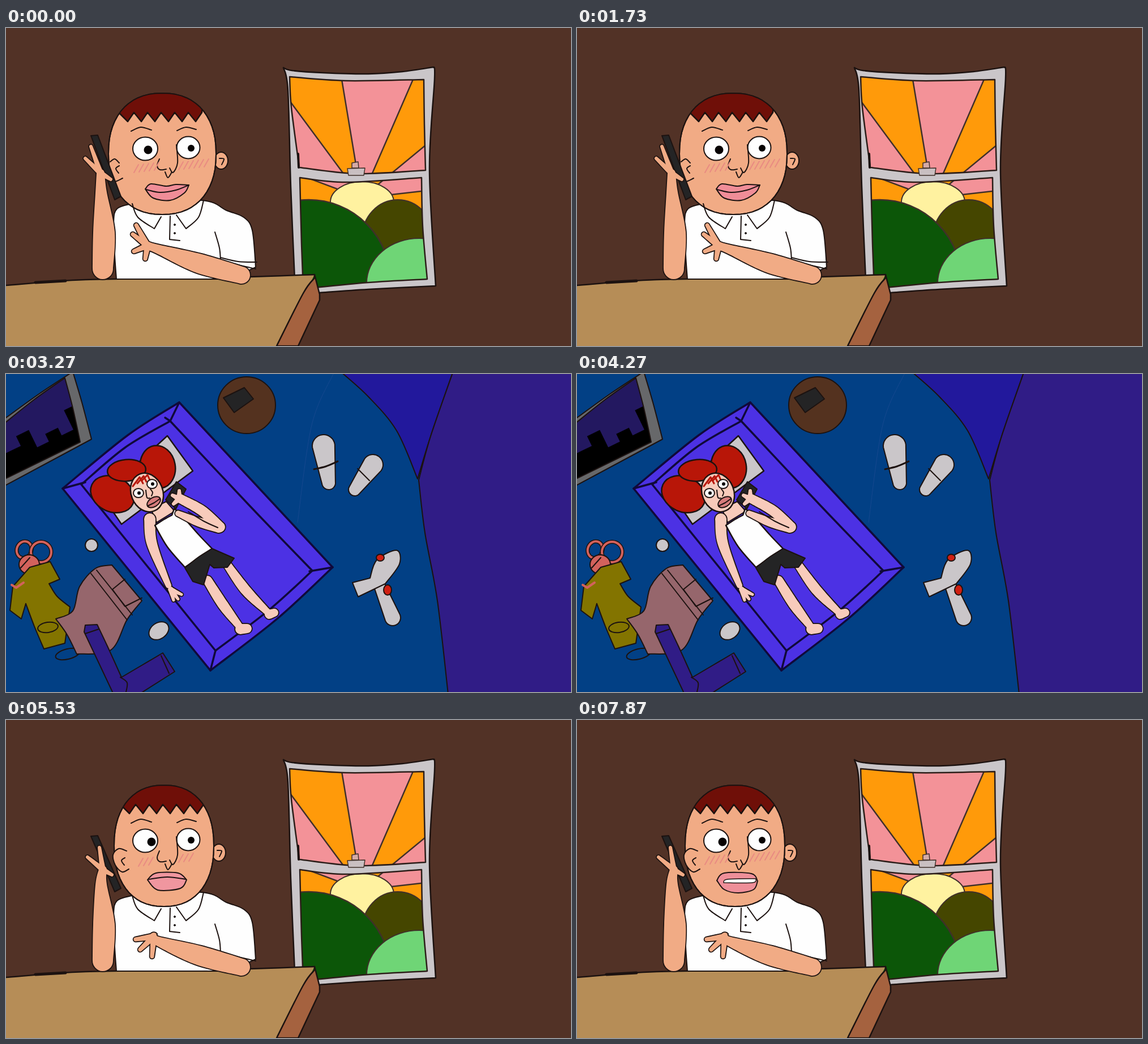
An HTML page for the animation above (8000 ms loop, 998 by 561 pixels).

```html
<!DOCTYPE html>
<html lang="en">
<head>
<meta charset="utf-8">
<title>Phone call</title>
<style>
html, body { margin: 0; width: 100%; height: 100%; overflow: hidden; background: #523226; }
svg { display: block; width: 100vw; height: 100vh; }
path, ellipse { stroke-linecap: round; stroke-linejoin: round; }
</style>
</head>
<body>
<svg id="stage" viewBox="0 0 998 561"></svg>
<script>
const INK = '#1c1210', SKIN = '#f1ab85', PALE = '#f8cbbb', WHITE = '#fefefe', GREY = '#cac6c9';
const DARK = '#242425', RED = '#b81608', BED = '#4c31e4', PURPLE = '#301c86', NAVY = '#10093a';

const times = (n, make) => Array.from({ length: n }, (_, i) => make(i));
const each = (n, make) => times(n, make).join('');
const parse = run => run.trim().split(/\s+/).map(p => p.split(',').map(Number));

// Cubic segments through the points, without the opening move.
function through(pts) {
  return each(pts.length - 1, i => {
    const a = pts[i], b = pts[i + 1], before = pts[i - 1] || a, after = pts[i + 2] || b;
    const c1 = a.map((v, k) => v + (b[k] - before[k]) / 6);
    const c2 = b.map((v, k) => v - (after[k] - a[k]) / 6);
    return `C${c1} ${c2} ${b}`;
  });
}
// "|" marks a corner between smooth runs.
function curve(spec) {
  const runs = spec.split('|').map(parse);
  return 'M' + runs[0][0] + runs.map((run, i) => through(i ? [runs[i - 1].at(-1), ...run] : run)).join('');
}
// A tapered limb with round ends through "x,y,radius" points.
function limb(spec) {
  const pts = parse(spec), n = pts.length - 1;
  const side = sign => pts.map(([x, y, r], i) => {
    const a = pts[Math.max(i - 1, 0)], b = pts[Math.min(i + 1, n)];
    const dx = b[0] - a[0], dy = b[1] - a[1], k = sign * r / Math.hypot(dx, dy);
    return [x - dy * k, y + dx * k];
  });
  const left = side(1), right = side(-1).reverse(), first = pts[0][2], last = pts[n][2];
  return `M${left[0]}${through(left)}A${last} ${last} 0 0 0 ${right[0]}${through(right)}A${first} ${first} 0 0 0 ${left[0]}Z`;
}
const path = (d, fill, width = 2, ink = INK) =>
  `<path d="${d}" fill="${fill}" stroke="${width ? ink : 'none'}" stroke-width="${width}"/>`;
const shape = (spec, fill, width, ink) => path(curve(spec) + 'Z', fill, width, ink);
const line = (spec, width, ink) => path(curve(spec), 'none', width, ink);
const oval = (x, y, rx, ry, fill, width = 2, turn = 0, ink = INK) =>
  `<ellipse cx="${x}" cy="${y}" rx="${rx}" ry="${ry}" fill="${fill}" stroke="${width ? ink : 'none'}" stroke-width="${width}" transform="rotate(${turn} ${x} ${y})"/>`;
const rect = fill => `<rect width="998" height="561" fill="${fill}"/>`;
const group = (id, content, extra = '') => `<g id="${id}" ${extra}>${content}</g>`;
const clipped = (id, d, content) =>
  `<clipPath id="${id}"><path d="${d}"/></clipPath><g clip-path="url(#${id})">${content}</g>`;
// Limbs merged into one silhouette.
const merged = (fill, limbs) =>
  limbs.map(s => path(limb(s), fill, 3.5)).join('') + limbs.map(s => path(limb(s), fill, 0)).join('');
const fingers = (palm, tips, r) => parse(tips).map(tip => `${palm},${r + 2} ${tip},${r}`);

function sunriseWindow() {
  const edge = '#40302a', cx = 628, cy = 300;
  const panes = curve('501,86|600,93 738,91|739,170 741,251|620,257 518,246|504,140 501,86') + 'Z' +
    curve('519,264|600,272 734,264|736,350 744,443|640,449 525,460|522,380 519,264') + 'Z';
  const ray = degrees => {
    const a = degrees * Math.PI / 180;
    return `${cx + 300 * Math.cos(a)},${cy - 300 * Math.sin(a)}`;
  };
  return shape('490,70|505,75 560,79 640,81 700,77 755,69|757,90 748,250 759,455|640,461 554,467|511,467|503,280 498,110 490,70', GREY, 2.5) +
    clipped('panes', panes, rect('#ff9a0a') +
      each(3, i => shape(`${cx},${cy}|${ray(6.5 + 60 * i)}|${ray(39.5 + 60 * i)}`, '#f39298', 2.5, edge)) +
      oval(629, 307, 56, 36, '#fff2a0', 2, 0, edge) + oval(692, 370, 63, 67, '#454600', 2, 0, edge) +
      oval(535, 450, 145, 147, '#0c5608', 2.5, 0, edge) + oval(730, 450, 93, 79, '#6fd576', 2, 0, edge)) +
    path(panes, 'none', 2.5, '#2b1d18') + line('516,222|517,246', 4) +
    shape('603,248|634,247|632,260|605,260', '#c9bfc1', 1.5, edge) +
    shape('611,238|622,236|623,247|611,247', '#d5aaa5', 1.5, edge);
}

const table = () =>
  shape('0,454|140,444 355,441 545,435|525,475 478,561|0,561', '#b68d57', 0) +
  shape('545,435|554,470|554,480|516,561|478,561|525,468 545,441', '#a5623f', 2.5) +
  line('0,454|140,444 355,441 545,435', 2.5) + line('52,449|105,446', 5);

const poses = [
  { cx: 276, rx: 95, look: 251, phone: [150, 190], wrist: '167,256', raised: '140,230 150,209 185,267', palm: '250,384', spread: '230,348 224,364 226,394 246,407' },
  { cx: 274, rx: 87, look: 252, phone: [148, 195], wrist: '167,260', raised: '142,234 152,222 184,269', palm: '252,385', spread: '233,349 225,365 233,399 246,410' },
  { cx: 279, rx: 88, look: 257, phone: [150, 205], wrist: '171,264', raised: '144,242 165,225 187,273', palm: '261,382', spread: '229,387 237,405 258,417', talking: true }
];

function head({ cx, rx }) {
  const cy = 222, power = v => Math.sign(v) * Math.abs(v) ** .88;
  return 'M' + times(60, i => {
    const a = i * Math.PI / 30;
    return [cx + rx * power(Math.cos(a)), cy + 107 * power(Math.sin(a))].map(v => v.toFixed(1));
  }).join('L') + 'Z';
}

function hair({ cx }, index) {
  const left = cx - 74, step = 24;
  const fringe = times(6, i => `${left + step * i + 13},165|${left + step * (i + 1)},149`).join('|');
  return clipped('scalp' + index, head(poses[index]),
    shape(`${left - 6},146|${fringe}|${cx + 75},100|${cx - 75},100`, '#6f0f08', 2.5));
}

function man(pose, index) {
  const { cx, rx, look, phone: [px, py], talking } = pose, left = cx - rx, right = cx + rx;
  const ear = `${left + 22},231 ${left + 8},227 ${left - 2},238 ${left + 2},256 ${left + 14},268 ${left + 26},263`;
  const outline = head(pose);
  return group('man' + index,
    oval(right + 9, 234, 12, 15, SKIN) + line(`${right + 6},230 ${right + 14},231 ${right + 10},241`) +
    shape('195,443|192,400 190,345 196,319 226,309|346,304 390,322 420,334 435,357 441,422|430,427|428,443', WHITE) +
    path(outline, SKIN) + hair(pose, index) + path(outline, 'none') +
    line('223,310|233,334 262,354|274,333') + line('301,330|318,354|340,334 349,304') + line('290,332|289,373|307,375') +
    each(2, i => oval(298, 347 + 15 * i, 1.5, 1.5, INK, 1)) +
    line('369,360 377,388 379,411') + line('379,412 410,418 441,425') + (talking ? '' : line('379,405 410,412 443,413')) +
    (talking ? shape(ear, SKIN, 0) + line(ear) : line(`${left + 3},236 ${left + 11},231 ${left + 19},238`) + line(`${left + 4},261 ${left + 10},271 ${left + 25},265`)) +
    line(`${left + 19},243 ${left + 13},248 ${left + 18},256`) +
    line('221,182 238,175 257,180') + line('302,181 318,175 336,179') +
    oval(246, 213, 22, 20.5, WHITE) + oval(322, 211, 20.5, 19.5, WHITE) +
    oval(look, 215, 7.5, 7.5, '#080404', 0) + oval(327, 212, 6, 6, '#080404', 0) +
    line('271,231 267,243 272,250 283,249') + line('301,206 303,238 295,255 289,247') + line('281,254 286,264 293,254') +
    (talking ? '' : shape('246,284 256,275 283,279 300,276 323,277|315,291 290,304 260,300 246,284', '#f08d98') + line('248,285 272,290 300,286 323,277')) +
    shape(`${px},${py}|${px + 12},${py - 1}|203,297|192,303`, DARK) +
    merged(SKIN, [`171,425,18 173,360,19 168,290,10 ${pose.wrist},7`, ...fingers(pose.wrist, pose.raised, 3)]) +
    merged(SKIN, [`416,436,15 340,415,17 268,390,8 ${pose.palm},7`, ...fingers(pose.palm, pose.spread, 3.5)]));
}

const hatch = (x, y, count) => each(count, i => line(`${x + i * 9},${y - i}|${x + i * 9 + 8},${y - i - 14}`, 2, '#e98b82'));

const dayRoom = () => group('day', rect('#523226') + sunriseWindow() + table() + poses.map(man).join('') +
  group('denseBlush', hatch(226, 255, 5) + hatch(305, 250, 6)) +
  group('lightBlush', hatch(234, 258, 3) + hatch(305, 251, 3)) +
  group('closedMouth', shape('250,282 265,270 304,270 319,282|308,297 268,300 250,282', '#f0969f') + line('252,281 285,277 318,281')) +
  group('teethMouth', shape('247,283 260,270 308,271 319,284|312,299 285,305 260,299 247,283', '#ee8f99') +
    shape('259,287 266,281 316,280|310,287 259,287', WHITE, 1.5)));

function nightWindow() {
  const towers = [40, 40, 59, 25, 40, 25, 63];
  const pane = curve('-4,88|50,45 104,7|118,60 131,120|-4,186') + 'Z';
  return shape('-4,80|60,34 118,-4|134,50 151,115|-4,198', '#67686a') +
    clipped('nightPane', pane, rect('#231860') + group('skyline', towers.map((h, i) =>
      `<rect x="${5 + 24 * i}" y="${-h}" width="25" height="${h + 40}"/>`).join(''), 'transform="translate(-4 186) rotate(-26)"')) +
    path(pane, 'none');
}

function clothes() {
  const coral = '#d3625c';
  const loop = (x, y, rx, ry, turn) => oval(x, y, rx, ry, 'none', 7, turn) + oval(x, y, rx, ry, 'none', 4, turn, coral);
  return oval(151, 302, 11, 11, GREY) + oval(270, 453, 19, 14, GREY, 2, -35) +
    loop(32, 310, 13, 15, 20) + loop(62, 314, 18, 18, 0) + oval(41, 336, 18, 17, coral) + line('42,324|26,342') +
    shape('12,375|42,341|78,331|95,362|76,370|90,392 113,411|104,475|67,485|50,445 35,405|27,432|7,417', '#837400') +
    line('10,372|18,377|31,368', 4, coral) + oval(74, 447, 18, 9, 'none', 2, -8) + oval(109, 494, 22, 9, 'none', 2, -14) +
    shape('88,432|118,418 130,375 158,343 187,337|240,400|214,433 185,487 125,494|108,460 88,432', '#96666c') +
    each(2, i => line(`${150 + 10 * i},${352 - 6 * i}|${214 + 9 * i},${434 - 9 * i}`)) +
    line('210,362|188,380|210,410|240,395') +
    shape('138,455|140,443|161,442|180,482 204,535|277,492|298,525|235,565|190,565', PURPLE) +
    line('140,458|164,450') + line('274,497|288,528') + line('202,535 214,545 211,565');
}

const bed = () =>
  shape('306,50|215,108 100,202|361,523|480,431 577,341', BED, 3.5, NAVY) +
  line('290,83|210,130 133,195|370,488|465,416 541,347|430,232 290,83', 3.5, NAVY) +
  ['306,50|290,83|281,77', '100,202|140,191', '577,341|536,348', '361,523|370,488'].map(s => line(s, 3.5, NAVY)).join('') +
  shape('285,109|330,171|204,265|170,215', GREY, 2.5);

const eye = (x, y) => oval(x, y, 9, 8, WHITE) + oval(x + 1, y, 3, 3, '#080404', 0);

const woman = () =>
  merged(PALE, ['356,364,8 384,408,9 413,446,6', '414,450,9 426,449,8']) +
  merged(PALE, ['391,337,7 424,382,9 461,419,6', '465,424,8 474,421,7']) +
  shape('256,238|266,262|298,242|283,225', PALE) +
  merged(PALE, ['254,256,10 258,300,9 287,373,5', ...fingers('291,380', '296,399 304,397 310,389', 2.5)]) +
  shape('263,267|280,256 293,249|297,238|305,243|340,283 364,308|316,341|285,305 263,267', WHITE, 2.5) +
  shape('316,342|340,323 364,308|403,325|391,341|367,342|360,336|349,372|330,366', DARK) +
  oval(188, 212, 40, 31, RED, 2.5, 25) + oval(268, 164, 31, 38, RED, 2.5, -10) + oval(213, 170, 34, 19, RED, 2.5, -5) +
  oval(249, 209, 28, 35, PALE, 2.5, -22) +
  each(3, i => line(`${224 + 8 * i},${198 - 5 * i}|${236 + 7 * i},${182 - 2 * i}|${242 + 6 * i},${193 - 3 * i}`, 3, RED)) +
  eye(234, 210) + eye(258, 194) + line('247,205 249,218 254,219') + line('255,203 259,209 257,215') +
  oval(261, 226, 13, 8, '#d77c7c', 2, -32) + line('250,233|262,227|272,220') +
  shape('282,222|301,190|318,203|300,238', DARK) +
  merged(PALE, ['304,246,5 340,261,8 376,270,10', '308,220,8 346,241,9 378,270,9', ...fingers('306,220', '306,206 294,214 296,229', 3)]) +
  line('322,243 350,260 374,271');

const nightRoom = () => group('night', rect('#024085') +
  shape('590,-5|640,40 690,100 727,185|750,110 790,-5', '#22189c') +
  shape('790,-5|750,110 729,187|740,280 762,400 781,565|1005,565|1005,-5', PURPLE) +
  line('578,0|540,90 515,262', 1, '#16488f') + nightWindow() + clothes() + bed() +
  oval(425, 55, 51, 50, '#54321f') + shape('384,42|421,24|437,44|403,68', DARK) +
  path(limb('561,127,20 570,192,12'), GREY) + line('544,168 565,163 586,154', 3) +
  path(limb('648,160,18 616,204,11'), GREY) + line('621,167|642,188') +
  path(limb('660,374,10 683,430,14'), GREY) +
  shape('612,368|643,360|655,328 690,311 695,335 670,370|622,393', GREY) +
  oval(661, 324, 7, 6, '#d01f12') + oval(674, 381, 7, 9, '#d01f12') + group('woman', woman()));

const byId = id => document.getElementById(id);
byId('stage').innerHTML = dayRoom() + nightRoom();
const show = (id, on) => byId(id).setAttribute('display', on ? 'inline' : 'none');

const LOOP = 8000, NIGHT = 2600, CALL_BACK = 5530;

function draw(t) {
  const phase = t % 1000, between = (from, to) => phase >= from && phase < to;
  const night = t >= NIGHT && t < CALL_BACK;
  const alternate = between(130, 270) || between(530, 600) || between(870, 1000);
  const pose = t >= CALL_BACK ? 2 : alternate ? 1 : 0;
  const light = t > 1000 && between(400, 730);
  const shut = between(0, 270) || between(530, 600);
  show('day', !night);
  show('night', night);
  poses.forEach((_, i) => show('man' + i, i === pose));
  show('lightBlush', light);
  show('denseBlush', !light);
  show('closedMouth', pose === 2 && shut);
  show('teethMouth', pose === 2 && !shut);
  byId('woman').setAttribute('transform', alternate ? 'translate(-1 1) rotate(-.6 310 300)' : '');
}

const start = performance.now();
function tick() {
  draw((performance.now() - start) % LOOP);
  requestAnimationFrame(tick);
}
tick();
</script>
</body>
</html>
```
